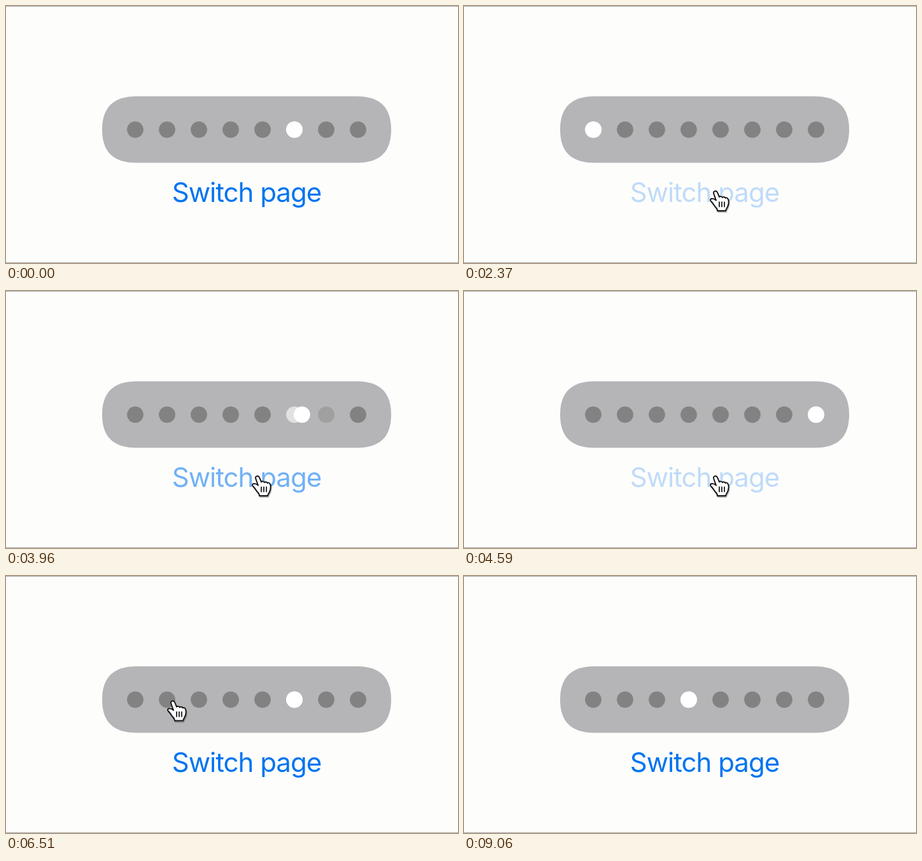
Animation of 710 by 404 pixels, one loop 9720 ms. Source, as an HTML page:

```html
<!DOCTYPE html>
<html lang="en">
<head>
<meta charset="utf-8">
<title>Page control</title>
<style>
  html, body { margin: 0; width: 100%; height: 100%; overflow: hidden; background: #fdfdfc; }
  svg { display: block; width: 710px; height: 404px; }
  text { font: 400 42px Inter, Roboto, sans-serif; letter-spacing: -1px; fill: #0074f0; }
</style>
</head>
<body>
<svg viewBox="0 0 710 404">
  <path d="M0 .5H710M0 403.5H710" stroke="#a5a5a5"/>
  <path fill="#b5b5b8" d="M205 142H551C588 142 605 160 605 194.300C605 229 588 246.500 551 246.500H205C168 246.500 151 229 151 194.300C151 160 168 142 205 142Z"/>
  <g id="dots"></g>
  <circle id="marker" cy="194.300" r="12.900" fill="#fff"/>
  <text id="label" x="378" y="307.800" text-anchor="middle">Switch page</text>
  <g id="hand" stroke="#111" stroke-linejoin="round" stroke-linecap="round">
    <path id="palm" fill="#fff" stroke-width="1.900" d="M-2 .5C-3.500 1.500-3 3.500-2.400 5L1 14.500C-1 12.500-4 11.500-6.500 12C-9 13-8 15.500-6 17C-3 20-1.500 24 1 26C2.500 27.500 3 28.500 3 31H16C16.500 28 19 26 20 22C21 18 20.800 14 19.500 12C18.500 10 16.500 10 15.800 11C15 9 12 8.600 11 10C10 8 7 7.800 6 9.200L3 2C2-.3-.3-.6-2 .5Z"/>
    <path fill="none" stroke-width="1.700" d="M6 17v7.500M10 17v7.500M14 17v7.500"/>
  </g>
</svg>
<script>
const LOOP = 9720;
const SLIDE = 300, PRESS = 130, FADE = 470, DIM = 0.24;
const TRAVEL = 390, SETTLE = 150;
const GREY = 130, WHITE = 255, FIRST_PAGE = 5;

const $ = id => document.getElementById(id);
const ease = p => { p = Math.min(1, Math.max(0, p)); return p * p * (3 - 2 * p); };
const mix = (a, b, p) => a + (b - a) * p;
const dotX = page => 203 + 50 * page;

// The button is tapped at a steady pace, then single dots are clicked.
const taps = [2, 7, 0, 7, 4, 6, 5, 7, 3].map((page, i) => ({ time: 1236 + 420 * i, page }));
const clicks = [[5500, 7], [5800, 5], [6660, 1], [7260, 6], [7836, 4], [8220, 3]]
  .map(([time, page]) => ({ time, page }));
const moves = [...taps, ...clicks];

// Fingertip legs: each starts where the one before it ended.
const legs = [
  { start: 510, end: 930, x: 397, y: 300 },
  { start: 1170, end: 2100, x: 395, y: 291 },
  { start: 5130, end: 5310, x: 381, y: 197.500 }
];
let lastClick = 5310;
for (const { time, page } of clicks) {
  const end = Math.max(time - SETTLE, lastClick + SETTLE);
  legs.push({ start: Math.max(lastClick, end - TRAVEL), end, x: dotX(page) + 9, y: 196.500 });
  lastClick = time;
}
legs.push({ start: 8340, end: 9050, x: 102, y: 10 });

const dots = Array.from({ length: 8 }, (_, page) => {
  const dot = $('marker').cloneNode();
  dot.removeAttribute('id');
  dot.setAttribute('cx', dotX(page));
  return $('dots').appendChild(dot);
});

const shadow = $('palm').cloneNode();
shadow.removeAttribute('id');
shadow.setAttribute('transform', 'translate(1 2)');
shadow.setAttribute('opacity', 0.3);
$('hand').prepend(shadow);

function drawPages(t) {
  let from = FIRST_PAGE, to = FIRST_PAGE, p = 1;
  for (const { time, page } of moves) {
    if (t < time) break;
    from = to;
    to = page;
    p = ease((t - time) / SLIDE);
  }
  dots.forEach((dot, page) => {
    const lit = page === to ? p : page === from ? 1 - p : 0;
    const level = Math.round(mix(GREY, WHITE, lit));
    dot.setAttribute('fill', `rgb(${level}, ${level}, ${level})`);
  });
  $('marker').setAttribute('cx', mix(dotX(from), dotX(to), p));
}

function drawLabel(t) {
  let alpha = 1;
  for (const { time } of taps) {
    if (t >= time - PRESS) alpha = mix(DIM, 1, ease((t - time) / FADE));
  }
  $('label').setAttribute('opacity', alpha);
}

function drawHand(t) {
  let x = 420, y = 410;
  for (const leg of legs) {
    const p = ease((t - leg.start) / (leg.end - leg.start));
    x = mix(x, leg.x, p);
    y = mix(y, leg.y, p);
  }
  const shown = t >= legs[0].start && t < legs[legs.length - 1].end;
  $('hand').setAttribute('visibility', shown ? 'visible' : 'hidden');
  $('hand').setAttribute('transform', `translate(${x} ${y})`);
}

const origin = performance.now();
function frame() {
  const t = (performance.now() - origin) % LOOP;
  drawPages(t);
  drawLabel(t);
  drawHand(t);
  requestAnimationFrame(frame);
}
frame();
</script>
</body>
</html>
```
